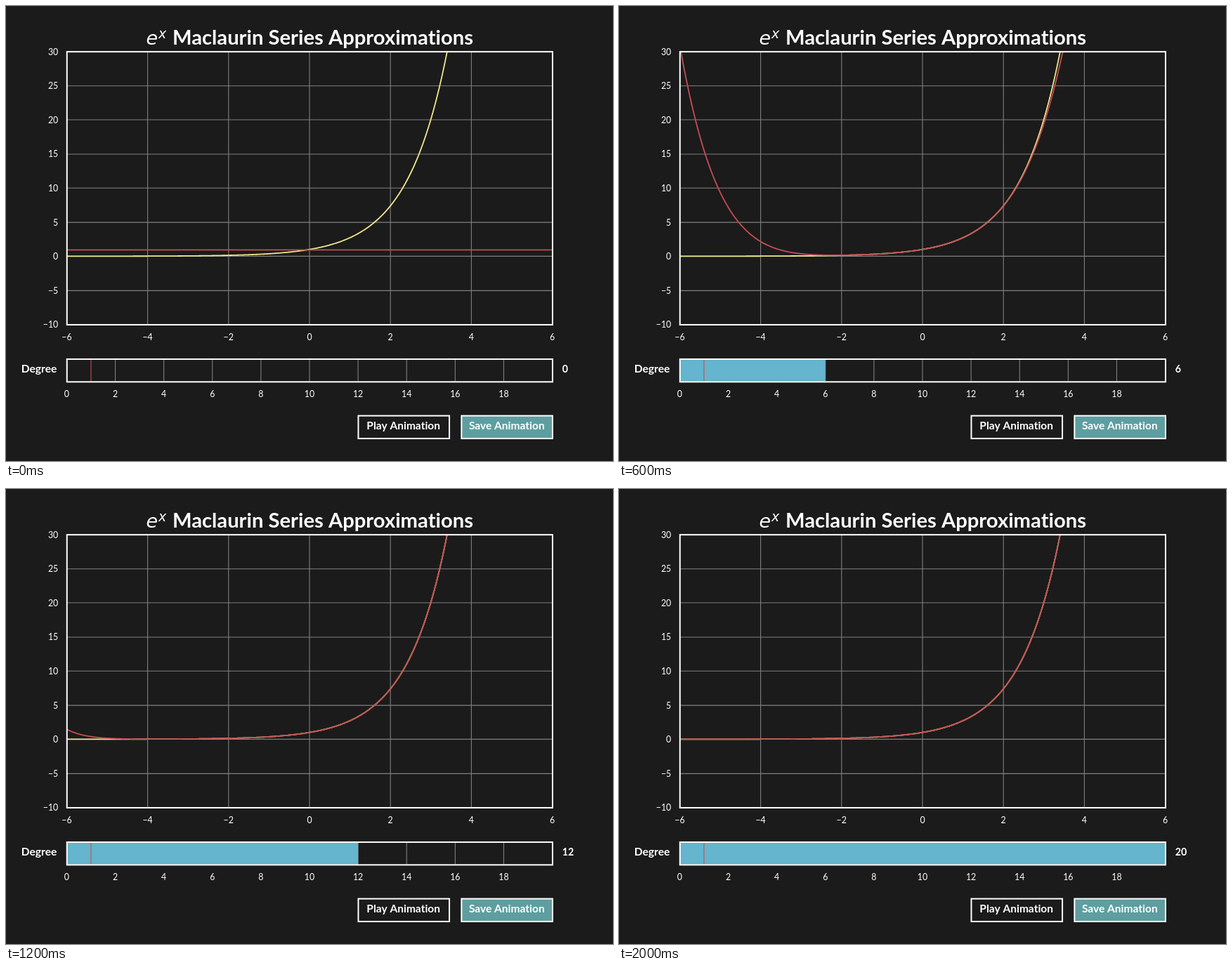
An HTML page with a canvas that plays this animation: 864 by 648 pixels, repeating every 2200 ms.

```html
<!DOCTYPE html>
<html lang="en">
<head>
<meta charset="utf-8">
<title>Maclaurin Series Approximations</title>
<style>
  html, body { margin: 0; width: 100%; height: 100%; overflow: hidden; background: #1b1b1b; }
  canvas { display: block; }
</style>
</head>
<body>
<canvas id="stage" width="864" height="648"></canvas>
<script>
const ctx = document.getElementById('stage').getContext('2d');

const STEP = 200, STATES = 11;
const BG = '#1b1b1b', WHITE = '#fff', GRID = '#808080';
const YELLOW = '#f0e68c', RED = '#c44e52', BLUE = '#64b5cd', TEAL = '#5f9ea0';
const LEFT = 86.4, RIGHT = 777.6, TOP = 64.8, BOTTOM = 453.6;
const BAR_TOP = 502.2, BAR_BOTTOM = 534.6;
const THIN = 1.1, THICK = 1.8, BORDER = 2;

const px = x => LEFT + (x + 6) / 12 * (RIGHT - LEFT);
const py = y => BOTTOM - (y + 10) / 40 * (BOTTOM - TOP);
const barX = d => LEFT + d / 20 * (RIGHT - LEFT);
const label = n => String(n).replace('-', '\u2212');

// The layout lives on a 1200 x 900 pixel grid, shown at 72 percent.
const UNIT = 0.72;
const snap = v => Math.floor(v / UNIT + 0.5 + 1e-6) * UNIT;
const snapMid = v => snap(v) + UNIT / 2;

function line(x1, y1, x2, y2, color, width) {
  ctx.strokeStyle = color;
  ctx.lineWidth = width;
  ctx.beginPath();
  ctx.moveTo(x1, y1);
  ctx.lineTo(x2, y2);
  ctx.stroke();
}

const vline = (x, top, bottom, color) => line(snap(x), top, snap(x), bottom, color, THIN);
const hline = (y, color) => line(LEFT, snap(y), RIGHT, snap(y), color, THIN);

function frame(x1, y1, x2, y2, fill) {
  const [l, t, r, b] = [x1, y1, x2, y2].map(snapMid);
  if (fill) {
    ctx.fillStyle = fill;
    ctx.fillRect(l, t, r - l, b - t);
  }
  ctx.strokeStyle = WHITE;
  ctx.lineWidth = BORDER;
  ctx.strokeRect(l, t, r - l, b - t);
}

function text(str, x, y, font, align = 'center') {
  ctx.fillStyle = WHITE;
  ctx.font = font;
  ctx.textAlign = align;
  ctx.fillText(str, x, y);
}

const TICK = '12.4px Lato, sans-serif';
const bold = size => `bold ${size}px Lato, sans-serif`;
const math = size => `italic ${size}px "DejaVu Sans", sans-serif`;

function curve(fn, color) {
  ctx.beginPath();
  for (let i = 0; i <= 480; i++) {
    const x = -6 + i / 40;
    ctx.lineTo(px(x), py(fn(x)));
  }
  ctx.strokeStyle = color;
  ctx.lineWidth = THICK;
  ctx.lineJoin = 'round';
  ctx.stroke();
}

function maclaurin(x, degree) {
  let term = 1, sum = 1;
  for (let k = 1; k <= degree; k++) {
    term *= x / k;
    sum += term;
  }
  return sum;
}

function drawPlot(degree) {
  for (let x = -6; x <= 6; x += 2) {
    if (Math.abs(x) < 6) vline(px(x), TOP, BOTTOM, GRID);
    text(label(x), px(x), 475.5, TICK);
  }
  for (let y = -10; y <= 30; y += 5) {
    if (y > -10 && y < 30) hline(py(y), GRID);
    text(label(y), 74.3, py(y) + 4.8, TICK, 'right');
  }
  ctx.save();
  ctx.beginPath();
  ctx.rect(LEFT, TOP, RIGHT - LEFT, BOTTOM - TOP);
  ctx.clip();
  curve(Math.exp, YELLOW);
  if (degree) curve(x => maclaurin(x, degree), RED);
  else line(LEFT, snapMid(py(1)), RIGHT, snapMid(py(1)), RED, THICK);
  ctx.restore();
  ctx.lineJoin = 'miter';
  frame(LEFT, TOP, RIGHT, BOTTOM);
}

function drawSlider(degree) {
  for (let d = 0; d < 20; d += 2) {
    if (d) vline(barX(d), BAR_TOP, BAR_BOTTOM, GRID);
    text(d, barX(d), 556.6, TICK);
  }
  ctx.fillStyle = BLUE;
  ctx.fillRect(LEFT, BAR_TOP, barX(degree) - LEFT, BAR_BOTTOM - BAR_TOP);
  vline(barX(1), BAR_TOP, BAR_BOTTOM, RED);
  frame(LEFT, BAR_TOP, RIGHT, BAR_BOTTOM);
  text('Degree', 72.3, 522, bold(15.6), 'right');
  text(degree, 791.7, 522.3, bold(14.2), 'left');
}

function draw(degree) {
  ctx.letterSpacing = '0.01px'; // keeps "ti" from joining into a ligature
  ctx.fillStyle = BG;
  ctx.fillRect(0, 0, 864, 648);

  text('e', 199.5, 55, math(27), 'left');
  text('x', 217, 46, math(19), 'left');
  text('Maclaurin Series Approximations', 451, 55, bold(29.2));

  drawPlot(degree);
  drawSlider(degree);
  frame(501.12, 583.2, 630.72, 615.6);
  text('Play Animation', 565.7, 603.3, bold(15.5));
  frame(648, 583.2, 777.6, 615.6, TEAL);
  text('Save Animation', 712.8, 603.3, bold(15.5));
}

const start = performance.now();
function tick() {
  const elapsed = Math.max(0, performance.now() - start);
  draw(2 * (Math.floor(elapsed / STEP) % STATES));
  requestAnimationFrame(tick);
}
tick();
</script>
</body>
</html>
```
